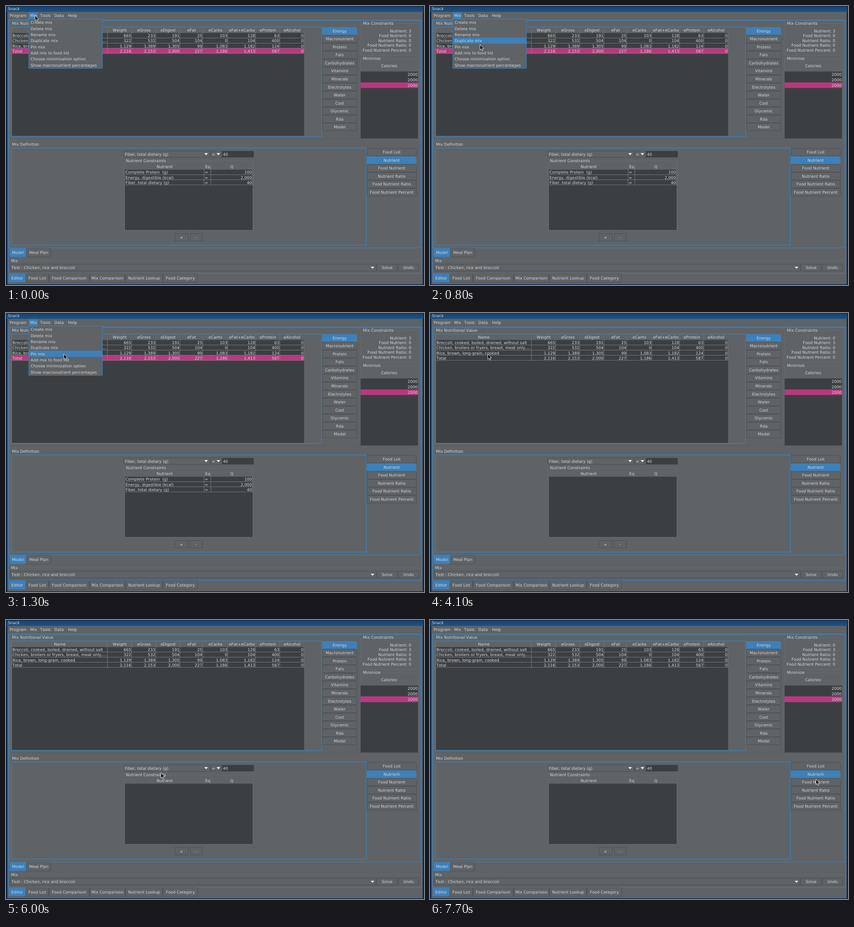
Recreate the animation shown at these times as an HTML page with a canvas. Size 917x611 px, loop 8 s.

```html
<!DOCTYPE html>
<html lang="en">
<head>
<meta charset="utf-8">
<title>Snack</title>
<style>
html, body { margin: 0; width: 100%; height: 100%; overflow: hidden; background: #5f6366; }
canvas { display: block; width: 917px; height: 611px; }
</style>
</head>
<body>
<canvas id="stage" width="917" height="611"></canvas>
<script>
const ctx = document.getElementById('stage').getContext('2d');
const LOOP = 8000;
const BG = '#5f6366', DARK = '#3c3f41', BLUE = '#3d80ba', PINK = '#b9387f';
const INK = '#d6d8d9', EDGE = '#4b4f52', GRID = '#85888a', FRAME = '#6a6e71';

// Pointer tip: time, x, y. Each place holds until the next.
const path = [
  [0, 63, 20], [400, 66, 25], [500, 74, 37], [600, 86, 54], [700, 98, 71],
  [800, 109, 84], [900, 116, 90], [1000, 120, 91], [1100, 123, 90],
  [1200, 125, 89], [1300, 126, 89], [5400, 127, 90], [5600, 220, 198],
  [5800, 278, 288], [6000, 339, 334], [6300, 446, 363], [6500, 601, 345],
  [6700, 745, 333], [7000, 786, 328], [7200, 805, 326], [7500, 840, 331],
  [7700, 846, 348]
];
const menu = ['Create mix', 'Delete mix', 'Rename mix', 'Duplicate mix', 'Pin mix',
  'Add mix to food list', 'Choose minimization option', 'Show macronutrient percentages'];
const foods = [
  'Broccoli, cooked, boiled, drained, without salt|665|233|191|25|103|128|63|0',
  'Chicken, broilers or fryers, breast, meat only,...|322|532|504|104|0|104|400|0',
  'Rice, brown, long-grain, cooked|1,129|1,389|1,305|99|1,083|1,182|124|0',
  'Total|2,116|2,153|2,000|227|1,186|1,413|587|0'
].map(s => s.split('|'));
const foodHead = 'Name|Weight|eGross|eDigest|eFat|eCarbs|eFat+eCarbs|eProtein|eAlcohol'.split('|');
const foodCols = [13, 223, 276, 329, 382, 432, 487, 548, 601, 654];
const limits = [['Complete Protein  (g)', '=', '100'],
  ['Energy, digestible (kcal)', '=', '2,000'], ['Fiber, total dietary (g)', '=', '40']];
const limitCols = [261, 435, 450, 541];

function rect(x, y, x2, y2, color) {
  ctx.fillStyle = color;
  ctx.fillRect(x, y, x2 - x, y2 - y);
}
function box(x, y, x2, y2, color, width = 1) {
  ctx.strokeStyle = color;
  ctx.lineWidth = width;
  ctx.strokeRect(x, y, x2 - x, y2 - y);
}
function text(s, x, y, align = 'left') {
  ctx.fillStyle = INK;
  ctx.textAlign = align;
  ctx.fillText(s, x, y + 3.2);
}
function poly(points, fill) {
  ctx.beginPath();
  points.forEach(([x, y]) => ctx.lineTo(x, y));
  ctx.closePath();
  ctx.fillStyle = fill;
  ctx.fill();
}
function arrow(x, y) {
  poly([[x - 4, y - 2], [x + 4, y - 2], [x, y + 2.5]], '#f2f2f2');
}
function titled(s, x, y, x2, y2, tx) {
  box(x + .5, y + .5, x2 - .5, y2 - .5, FRAME, .8);
  rect(tx - 2, y - 4, tx + ctx.measureText(s).width + 2, y + 5, BG);
  text(s, tx, y);
}
function tab(s, x, y, x2, y2, on, radii) {
  ctx.beginPath();
  ctx.roundRect(x + .5, y + .5, x2 - x - 1, y2 - y - 1, radii);
  ctx.fillStyle = on ? BLUE : BG;
  ctx.fill();
  ctx.lineWidth = .9;
  ctx.strokeStyle = EDGE;
  if (!on) ctx.stroke();
  text(s, (x + x2) / 2, (y + y2) / 2, 'center');
}
function sideTabs(names, x, x2, top, active) {
  names.forEach((s, i) => {
    const y = top + i * 17.53;
    tab(s, x, y, x2, y + 17.6, i === active, [0, 5, 0, 0]);
  });
}
function bottomTabs(names, edges, y, y2) {
  names.forEach((s, i) => tab(s, edges[i], y, edges[i + 1], y2, i === 0, [0, 0, 4, 0]));
}
function button(s, x, y, x2, y2) {
  box(x + .5, y + .5, x2 - .5, y2 - .5, EDGE);
  text(s, (x + x2) / 2, (y + y2) / 2, 'center');
}

function table(cols, head, rows, top, bottom, isText, picked) {
  const x = cols[0], end = cols[cols.length - 1], pitch = 11.25;
  rect(x, top, end, bottom, DARK);
  head.forEach((s, i) => {
    text(s, (cols[i] + cols[i + 1]) / 2, top - 6.3, 'center');
    if (i) rect(cols[i] - .6, top - 12, cols[i], top, '#777b7e');
  });
  rows.forEach((row, r) => {
    const y = top + r * pitch;
    if (r === picked) rect(x, y, end, y + pitch, PINK);
    rect(x, y + pitch - .8, end, y + pitch, GRID);
    row.forEach((s, i) => {
      if (i < isText) text(s, cols[i] + 1, y + 5.7);
      else text(s, cols[i + 1] - 1.5, y + 5.7, 'right');
    });
  });
  if (rows.length) {
    cols.slice(1).forEach(c => rect(c - .8, top, c, top + rows.length * pitch, GRID));
  }
}

function shell() {
  rect(0, 0, 917, 611, '#0c2a50');
  const bar = ctx.createLinearGradient(0, 0, 0, 13);
  bar.addColorStop(0, '#163f6b');
  bar.addColorStop(1, '#1d5485');
  rect(1, 1, 915, 13, bar);
  rect(3, 13, 914, 609.5, BG);
  text('Snack', 4, 6.2);
  [['Program', 8], ['Tools', 75], ['Data', 106], ['Help', 136]].forEach(([s, x]) => text(s, x, 20.5));
  rect(3, 28, 914, 28.7, '#585c5f');
  box(5.2, 30.2, 911.8, 585.6, BLUE, 1.2);
  box(7.6, 31.8, 909, 529.8, BLUE, 1.2);

  bottomTabs(['Model', 'Meal Plan'], [7.5, 45, 99], 530.5, 550);
  bottomTabs(['Editor', 'Food List', 'Food Comparison', 'Mix Comparison', 'Nutrient Lookup',
    'Food Category'], [5.5, 43.5, 94, 183, 262, 344, 421], 586, 605.5);

  rect(28, 557.5, 908, 558.3, FRAME);
  text('Mix', 11, 558);
  box(9.5, 565.5, 811.5, 580.5, EDGE);
  text('Test - Chicken, rice and broccoli', 12, 573);
  arrow(804, 573);
  button('Solve', 813, 565, 859, 581);
  button('Undo', 860, 565, 906, 581);
}

function values(opened) {
  text('Mix Nutritional Value', 13, 37.7);
  box(12.2, 46, 692.6, 285.7, BLUE, 1.4);
  table(foodCols, foodHead, foods, 59.2, 284.5, 1, opened ? 3 : -1);
  sideTabs(['Energy', 'Macronutrient', 'Protein', 'Fats', 'Carbohydrates', 'Vitamins', 'Minerals',
    'Electrolytes', 'Water', 'Cost', 'Glycemic', 'Rda', 'Model'], 693.5, 770.7, 45.8, 0);
}

function constraints(opened, focused) {
  titled('Mix Constraints', 778, 38, 905, 109, 783);
  const counts = opened ? [3, 0, 0, 0, 0] : [0, 3, 0, 0, 0];
  ['Nutrient', 'Food Nutrient', 'Nutrient Ratio', 'Food Nutrient Ratio', 'Food Nutrient Percent']
    .forEach((s, i) => text(`${s}: ${counts[i]}`, 889, 54.5 + i * 10.55, 'right'));
  titled('Minimize', 778, 115, 905, 290, 783);
  text('Calories', 840.5, 131, 'center');
  rect(778, 143.5, 904, 290, DARK);
  rect(778, 167.5, 904, 179.5, PINK);
  if (focused) box(778.4, 167.9, 903.6, 179.1, '#c8379c', .8);
  for (let i = 0; i < 3; i++) text('2000', 903, 149.8 + i * 12, 'right');
}

function definition(opened) {
  rect(8, 290.5, 908, 291.2, '#585c5f');
  poly([[11, 296], [14, 292.5], [17, 296]], '#4f6f8a');
  rect(18.5, 293, 24, 294, '#4f6f8a');
  text('Mix Definition', 13, 303);
  box(12.2, 310.8, 790.6, 523.6, BLUE, 1.4);
  sideTabs(['Food List', 'Nutrient', 'Food Nutrient', 'Nutrient Ratio', 'Food Nutrient Ratio',
    'Food Nutrient Percent'], 791.5, 900.7, 311.3, 1);

  box(258.5, 317.5, 447.5, 331.5, EDGE);
  text('Fiber, total dietary (g)', 260.5, 324.3);
  arrow(439, 324.3);
  box(449.5, 317.5, 473, 331.5, EDGE);
  text('=', 451.5, 324.3);
  arrow(466, 324.3);
  rect(474, 317.5, 543.5, 331.5, DARK);
  box(474, 317.5, 543.5, 331.5, EDGE, .8);
  text('40', 476, 324.5);

  titled('Nutrient Constraints', 259, 339, 543, 492, 263);
  table(limitCols, ['Nutrient', 'Eq', 'Q'], opened ? limits : [], 358.5, 490.5, 2, -1);
  button('+', 370, 498, 400, 515);
  button('-', 404, 498, 431, 515);
}

function popup(row) {
  rect(50, 14, 69.5, 28, BLUE);
  rect(50, 28, 212, 137, BG);
  if (row >= 0) rect(50, 29.3 + row * 13.33, 212, 42.6 + row * 13.33, BLUE);
  box(49.9, 28.5, 211.5, 136.5, BLUE);
  menu.forEach((s, i) => text(s, 54, 36 + i * 13.33));
}

function pointer(x, y) {
  const shape = [[0, 0], [0, 11.6], [2.7, 9.1], [4.7, 13.4], [6.6, 12.5], [4.7, 8.4], [8.3, 8.2]];
  ctx.save();
  ctx.translate(x + .7, y + .7);
  poly(shape, '#050505');
  ctx.lineWidth = 1;
  ctx.strokeStyle = '#e8e8e8';
  ctx.stroke();
  ctx.restore();
}

function draw(t) {
  const opened = t < 4100;
  ctx.font = '8.7px "DejaVu Sans", Verdana, sans-serif';
  ctx.fontKerning = 'none';
  ctx.textRendering = 'geometricPrecision';
  shell();
  values(opened);
  constraints(opened, t >= 4300);
  definition(opened);

  const step = path.findLastIndex(p => p[0] <= t);
  // The menu highlight trails the pointer by one step.
  const from = path[Math.max(0, step - 1)];
  if (opened) popup(Math.floor((from[2] - 29.3) / 13.33));
  text('Mix', 53, 20.5);
  pointer(path[step][1], path[step][2]);
}

const start = performance.now();
function tick() {
  draw((performance.now() - start) % LOOP);
  requestAnimationFrame(tick);
}
tick();
</script>
</body>
</html>
```
